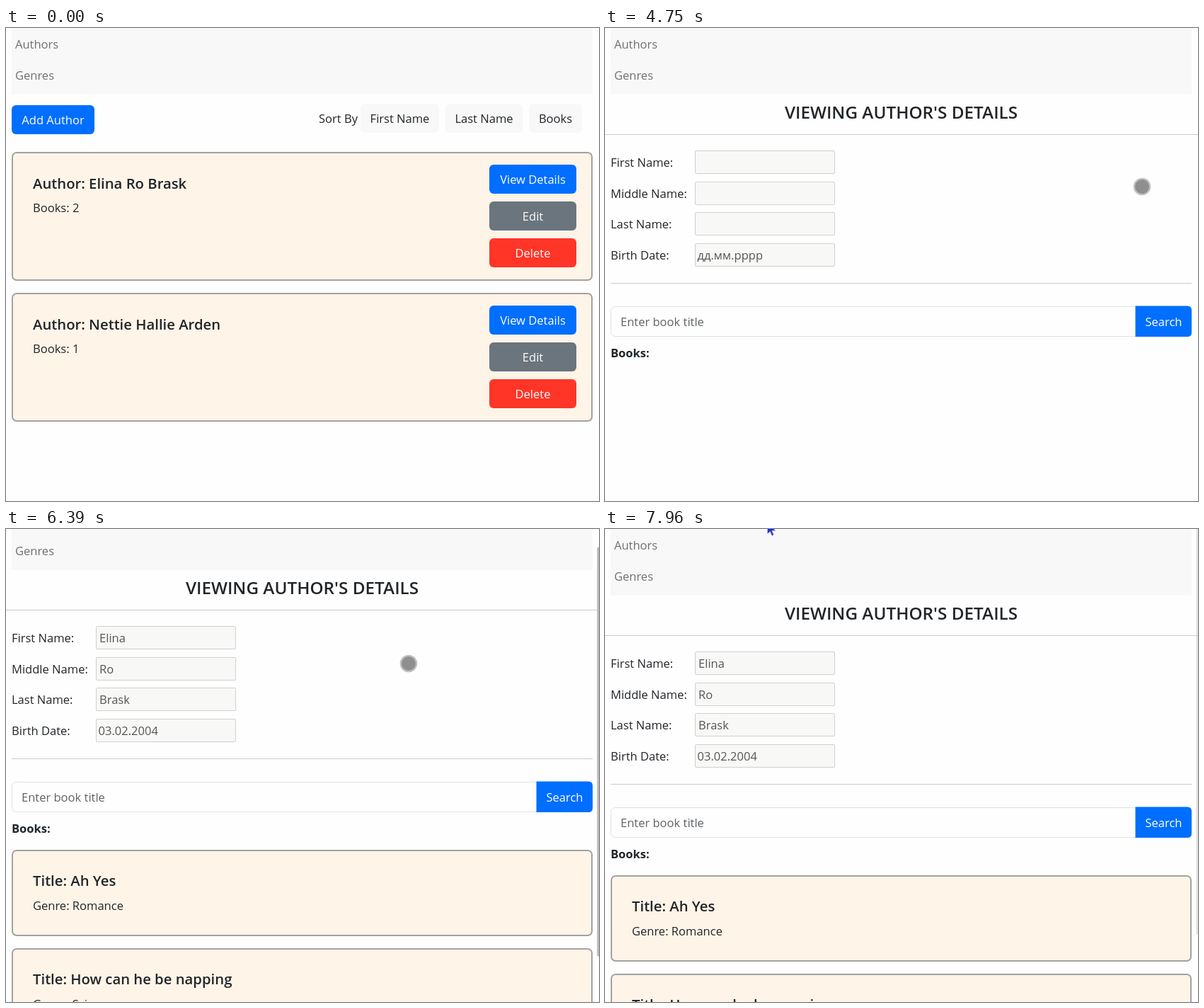
An HTML page for the animation above (8000 ms loop, 838 px wide and 668 px high).

```html
<!DOCTYPE html>
<html lang="en">
<head>
<meta charset="utf-8">
<title>Author list</title>
<style>
  html, body { margin: 0; width: 100%; height: 100%; overflow: hidden; background: #fefefe; }
  svg { display: block; width: 100vw; height: 100vh; }
  text { font: 400 16.55px "Open Sans", "Noto Sans", sans-serif; fill: #212529; white-space: pre; }
  .nav { fill: #707070; }
  .head { font-size: 20.3px; font-weight: 600; }
  .top { font-size: 24.3px; font-weight: 600; }
  .bold { font-weight: 700; }
  .mid { text-anchor: middle; }
  .on { fill: #fff; }
  .hint { fill: #5f6367; }
  .value { fill: #555; }
  .card { fill: #fef4e8; stroke: #a2a2a0; stroke-width: 2; }
  .field { fill: #f8f8f6; stroke: #d0d0d0; }
  .line { stroke: #cacaca; }
</style>
</head>
<body>
<svg id="stage" viewBox="0 0 838 668"></svg>
<script>
const BLUE = '#006eff', GRAY = '#6b757d', RED = '#ff3527', LIGHT = '#f8f8f8';
const first = { first: 'Elina', middle: 'Ro', last: 'Brask', books: 2 };
const second = { first: 'Nettie', middle: 'Hallie', last: 'Arden', books: 1 };

const text = (x, y, s, cls = '') => `<text x="${x}" y="${y}" class="${cls}">${s}</text>`;
const box = (x, y, w, h, fill, extra = '') =>
  `<rect x="${x}" y="${y}" width="${w}" height="${h}" rx="6" fill="${fill}" ${extra}/>`;
const card = (y, h) => `<rect x="9" y="${y}" width="819" height="${h}" rx="6" class="card"/>`;
const button = (x, y, w, fill, label, cls = 'on') =>
  box(x, y, w, 41, fill) + text(x + w / 2, y + 27, label, 'mid ' + cls);
const glow = (id, x, y, w) =>
  box(x + .5, y + .5, w - 1, 40, '#000', `id="${id}" fill-opacity="0" stroke="#ebebeb"`);

function sortButton(x, w, label, id) {
  return box(x, 107, w, 41, LIGHT) + (id ? glow(id, x, 107, w) : '') +
    text(x + w / 2, 134, label, 'mid');
}

function authorCard(y) {
  return `<g transform="translate(0 ${y})">` + card(176, 180) +
    text(38, 227, '', 'head name') + text(38, 260, '', 'count') +
    button(683, 193, 123, BLUE, 'View Details') +
    button(683, 245, 123, GRAY, 'Edit') +
    button(683, 297, 123, RED, 'Delete') + '</g>';
}

function bookCard(y, title, genre) {
  return card(y, 120) + text(38, y + 50, 'Title: ' + title, 'head') +
    text(38, y + 84, 'Genre: ' + genre);
}

function formRow(i, label, value, empty = '') {
  const y = 173 + Math.round(i * 43.7), base = y + 23, x = i === 3 ? 130.5 : 132;
  return text(8, base, label) +
    `<rect x="127.500" y="${y + .5}" width="197" height="32" rx="1.500" class="field"/>` +
    `<g class="filled">${text(x, base, value, 'value')}</g>` +
    (empty && `<g id="empty">${text(x, base, empty, 'value')}</g>`);
}

const list =
  button(8, 109, 117, BLUE, 'Add Author') + text(442, 134, 'Sort By') +
  sortButton(501, 111, 'First Name') + sortButton(621, 109, 'Last Name', 'lastGlow') +
  sortButton(739, 75, 'Books', 'booksGlow') + authorCard(0) + authorCard(199) +
  box(683, 193, 123, 41, '#000', 'id="press" opacity=".15"');

const details =
  text(418.5, 127.5, "VIEWING AUTHOR'S DETAILS", 'top mid') +
  '<path d="M0 150.5H838M8 360.5H829" class="line"/>' +
  formRow(0, 'First Name:', first.first) + formRow(1, 'Middle Name:', first.middle) +
  formRow(2, 'Last Name:', first.last) +
  formRow(3, 'Birth Date:', '03.02.2004', 'дд.мм.рррр') +
  box(8.5, 393.5, 820, 42, '#fefefe', 'stroke="#dfe2e5"') +
  `<path d="M749.500 392.500h73.500q6 0 6 6v31.500q0 6-6 6h-73.500z" fill="${BLUE}"/>` +
  text(22, 421, 'Enter book title', 'hint') + text(789.5, 421, 'Search', 'mid on') +
  text(8, 465, 'Books:', 'bold') +
  `<g class="filled">${bookCard(490, 'Ah Yes', 'Romance')}${
    bookCard(629, 'How can he be napping', 'Science')}</g>`;

const $ = id => document.getElementById(id);
const all = sel => [...document.querySelectorAll(sel)];

$('stage').innerHTML = `
  <g id="page">
    <rect x="8" y="-20" width="821" height="113.500" fill="#f8f8f8"/>
    ${text(13, 29, 'Authors', 'nav')}${text(13, 73, 'Genres', 'nav')}
    <g id="list">${list}</g>
    <g id="details">${details}</g>
  </g>
  <rect id="thumb" x="835.300" width="4" height="578" rx="1.500" fill="#b9b9b9"/>
  <g id="touch">
    <circle r="12.300" fill="#8c8c8c" fill-opacity=".55"/>
    <circle r="10" fill="#757575" fill-opacity=".65"/>
  </g>
  <path id="arrow" d="M0 0v16l3.800-3.500 2.600 6 2.600-1.200-2.600-5.800h5.200z" fill="#1f30d2" stroke="#dfe3f5" stroke-width=".5"/>`;

// start, end, steps, x, y, ease power, bow x, bow y
const moves = [
  [890, 1300, 7, 678, 130, 2],
  [2220, 2500, 5, 774, 132, 2],
  [2760, 2760, 1, 773, 132, 1],
  [3390, 3860, 7, 765.5, 262, 1.6, 6, 0],
  [4060, 4130, 2, 762.5, 265.5, 1],
  [4350, 4540, 3, 759, 224, 1.5],
  [5280, 5410, 3, 566, 188, 2, 0, -20],
  [6180, 6520, 6, 569.3, 190.3, 2],
  [6720, 6720, 1, 571.3, 190.5, 1],
  [6870, 7000, 3, 573.5, 193.3, 1],
  [7880, 7960, 2, 229.5, -9, 1]
];
// start, end, steps, offset, ease power
const scrolls = [
  [5610, 5810, 4, 105.6, 2],
  [6180, 6520, 6, 0, .98],
  [6870, 7000, 3, 105.6, 1.6],
  [7330, 7480, 3, 0, 1.15]
];

function progress(t, start, end, steps, power) {
  if (t < start) return 0;
  const done = t >= end ? steps : Math.floor((t + 5 - start) / (end - start) * (steps - 1)) + 1;
  return 1 - Math.pow(1 - Math.min(done / steps, 1), power);
}

function pointer(t) {
  if (t < 890) return [828.5, 643.5];
  let x = 860, y = 176;
  for (const [a, b, n, tx, ty, p, bx = 0, by = 0] of moves) {
    const k = progress(t, a, b, n, p), arc = 4 * k * (1 - k);
    x += (tx - x) * k + bx * arc;
    y += (ty - y) * k + by * arc;
  }
  return [x, y];
}

function offset(t) {
  let s = 0;
  for (const [a, b, n, to, p] of scrolls) s += (to - s) * progress(t, a, b, n, p);
  return Math.round(s);
}

const show = (el, on) => el.setAttribute('visibility', on ? 'inherit' : 'hidden');
const place = (el, x, y) => el.setAttribute('transform', `translate(${x} ${y})`);

function shade(el, t, from, peak, fade, end, until) {
  const up = progress(t, from, peak, 3, 1), down = progress(t, fade, end, 2, 1);
  el.setAttribute('fill-opacity', .07 * up * (1 - down));
  show(el, t >= from && t < until);
}

const names = all('.name'), counts = all('.count'), filled = all('.filled');

function draw(t) {
  const swapped = t >= 1560 && t < 2990;
  (swapped ? [second, first] : [first, second]).forEach((a, i) => {
    names[i].textContent = `Author: ${a.first} ${a.middle} ${a.last}`;
    counts[i].textContent = 'Books: ' + a.books;
  });
  shade($('lastGlow'), t, 1490, 1630, 1850, 1890, 2920);
  shade($('booksGlow'), t, 2920, 3050, 3120, 3190, 4750);
  show($('press'), t >= 4680 && t < 4750);

  // Groups toggle with display so hidden parents also hide their shown children.
  $('list').style.display = t < 4750 ? '' : 'none';
  $('details').style.display = t >= 4750 ? '' : 'none';
  filled.forEach(el => show(el, t >= 4820));
  show($('empty'), t < 4820);

  const s = offset(t);
  place($('page'), 0, -s);
  show($('thumb'), t >= 5610);
  $('thumb').setAttribute('y', s * .8635 - 5.5);
  $('thumb').setAttribute('opacity', t >= 7960 ? .4 : t >= 7880 ? .7 : 1);

  const [x, y] = pointer(t), out = t >= 7960;
  place($('touch'), x, y);
  place($('arrow'), x, y);
  show($('touch'), !out && (t >= 890 || (t >= 420 && t < 500)));
  show($('arrow'), out);
}

const t0 = performance.now();
function tick() {
  draw((performance.now() - t0) % 8000);
  requestAnimationFrame(tick);
}
tick();
</script>
</body>
</html>
```
